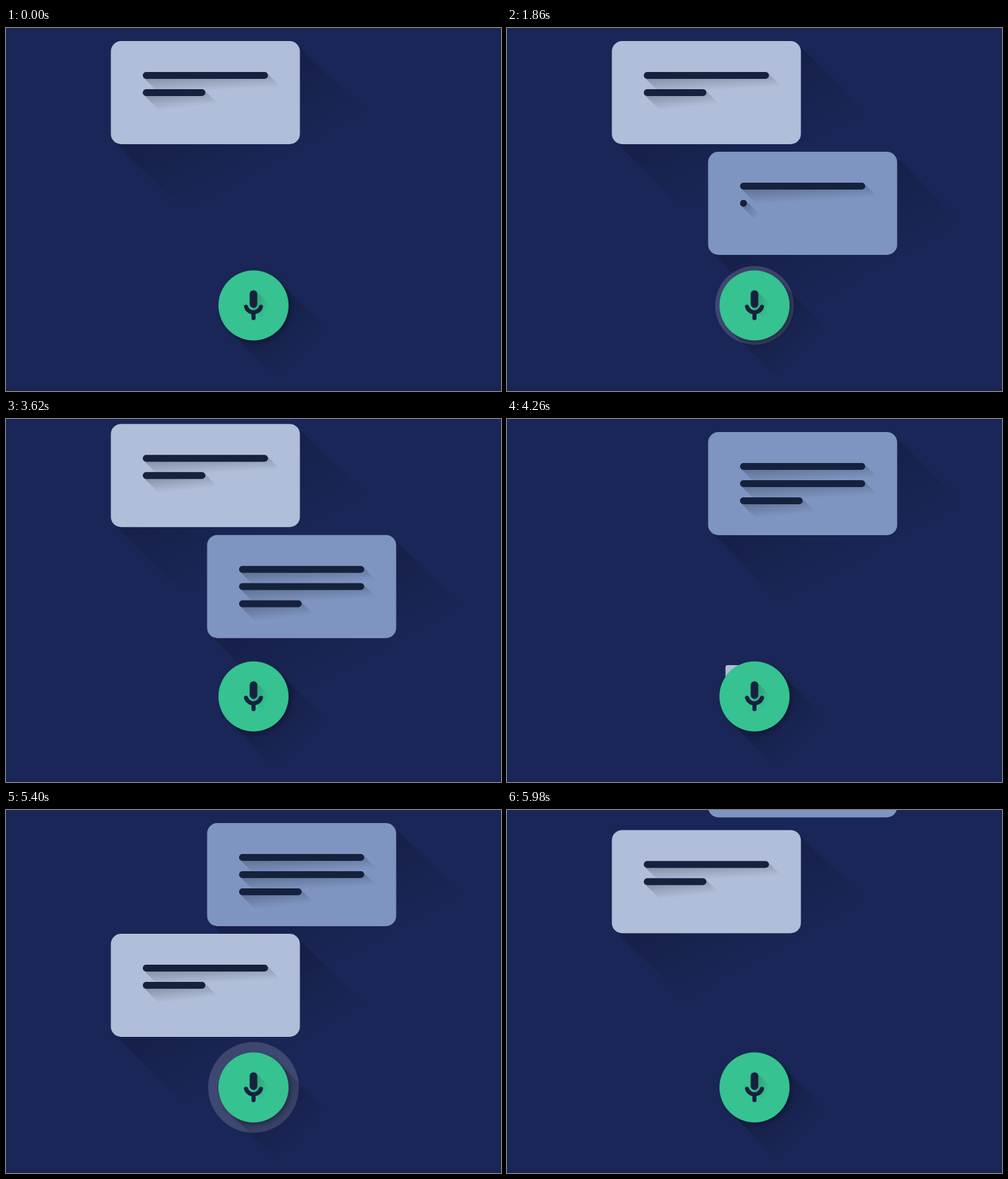
These frames come from a looping animation (720x528 px, 6 s). An HTML page with a canvas:

```html
<!DOCTYPE html>
<html lang="en">
<head>
<meta charset="utf-8">
<title>Voice chat</title>
<style>
  html, body { margin: 0; width: 100%; height: 100%; overflow: hidden; background: #1a2657; }
  canvas { display: block; }
</style>
</head>
<body>
<canvas id="stage" width="720" height="528"></canvas>
<script>
const ctx = document.getElementById('stage').getContext('2d');
const LOOP = 6000;
const PI = Math.PI;
const INK = '#16213e';
const MIC = { x: 360, y: 403.5, r: 51 };
const TOP = 19, LOW = 180, GONE = -150;
const LEVELS = [51, 77.5, 60, 70, 57, 77, 66, 77.5, 58, 68, 51];

const light = { x: 152.5, color: '#b0bed9', bars: [182, 91] };
const blue = { x: 292.5, color: '#7e95c2', bars: [182, 182, 91] };

const clamp = v => Math.min(1, Math.max(0, v));
const span = (t, a, b) => clamp((t - a) / (b - a));
const mix = (a, b, k) => a + (b - a) * k;

function box(x, y, w, h, r, color) {
  ctx.fillStyle = color;
  ctx.beginPath();
  ctx.roundRect(x, y, w, h, r);
  ctx.fill();
}

function disc(r, color) {
  ctx.fillStyle = color;
  ctx.beginPath();
  ctx.arc(MIC.x, MIC.y, r, 0, 2 * PI);
  ctx.fill();
}

// Rounded box swept by d at 45 degrees, fading out from its rising diagonal
function longShadow(x, y, w, h, r, d, alpha) {
  const cx = x + w / 2, cy = y + h / 2;
  const k = d * (w + h) / (w * w + h * h);
  const g = ctx.createLinearGradient(cx, cy, cx + h * k, cy + w * k);
  g.addColorStop(0, `rgba(0,0,0,${alpha})`);
  g.addColorStop(1, 'rgba(0,0,0,0)');
  const l = x + r, t = y + r, rt = x + w - r, b = y + h - r;
  ctx.fillStyle = g;
  ctx.beginPath();
  ctx.arc(l, b, r, 0.75 * PI, PI);
  ctx.arc(l, t, r, PI, 1.5 * PI);
  ctx.arc(rt, t, r, -0.5 * PI, -0.25 * PI);
  ctx.arc(rt + d, t + d, r, -0.25 * PI, 0);
  ctx.arc(rt + d, b + d, r, 0, 0.5 * PI);
  ctx.arc(l + d, b + d, r, 0.5 * PI, 0.75 * PI);
  ctx.closePath();
  ctx.fill();
}

// typed: how many pixels of text bars have been written so far
function drawCard(card, y, scale, typed, shade = 1) {
  if (scale <= 0) return;
  ctx.save();
  ctx.translate(MIC.x, MIC.y);
  ctx.scale(scale, scale);
  ctx.translate(-MIC.x, -MIC.y);
  longShadow(card.x, y, 275, 150, 15, 106, 0.18 * shade);
  box(card.x, y, 275, 150, 15, card.color);
  card.bars.forEach((full, i) => {
    const w = Math.min(full, typed);
    typed -= full;
    if (w <= 0) return;
    const bw = Math.max(10, w), bx = card.x + 46.5, by = y + 45 + i * 25;
    longShadow(bx, by, bw, 10, 5, 21, 0.23);
    box(bx, by, bw, 10, 5, INK);
  });
  ctx.restore();
}

function drawRing(age, alpha) {
  if (age <= 0 || alpha <= 0) return;
  const p = Math.min(age / 100, LEVELS.length - 1.001);
  const i = Math.floor(p);
  disc(mix(LEVELS[i], LEVELS[i + 1], p - i), `rgba(255,255,255,${0.155 * alpha})`);
}

function drawMic() {
  const { x, y, r } = MIC;
  longShadow(x - r, y - r, 2 * r, 2 * r, r, 72, 0.24);
  ctx.save();
  ctx.shadowColor = 'rgba(0,0,0,0.3)';
  ctx.shadowBlur = 6;
  ctx.shadowOffsetX = ctx.shadowOffsetY = 3;
  disc(r, '#36c291');
  ctx.restore();

  longShadow(354.5, 381.5, 11, 25.5, 5.5, 19, 0.17);
  box(354.5, 381.5, 11, 25.5, 5.5, INK);
  ctx.strokeStyle = INK;
  ctx.lineWidth = 6;
  ctx.lineCap = 'round';
  ctx.beginPath();
  ctx.arc(x, 402.3, 11.3, 0.09 * PI, 0.91 * PI);
  ctx.moveTo(x, 414);
  ctx.lineTo(x, 422);
  ctx.stroke();
}

function draw(t) {
  ctx.fillStyle = '#1a2657';
  ctx.fillRect(0, 0, 720, 528);
  ctx.fillStyle = '#192452';
  ctx.fillRect(0, 523, 720, 5);

  const up = span(t, 3600, 3900);
  const out = span(t, 5700, 6000);
  if (t < 3900) {
    drawCard(light, mix(TOP, GONE, up), 1, 273, 1 - up);
    drawCard(blue, mix(LOW, TOP, up), span(t, 900, 1200), 455 * span(t, 1460, 2440));
    drawRing(t - 1460, 1 - span(t, 2400, 2440));
  } else {
    drawCard(blue, mix(TOP, GONE, out), 1, 455, 1 - out);
    drawCard(light, mix(LOW, TOP, out), span(t, 4200, 4500), 273 * span(t, 4800, 5400));
    drawRing(Math.min(t - 4800, 600), 1 - span(t, 5500, 5540));
  }
  drawMic();
}

function tick() {
  draw(performance.now() % LOOP);
  requestAnimationFrame(tick);
}
tick();
</script>
</body>
</html>
```
